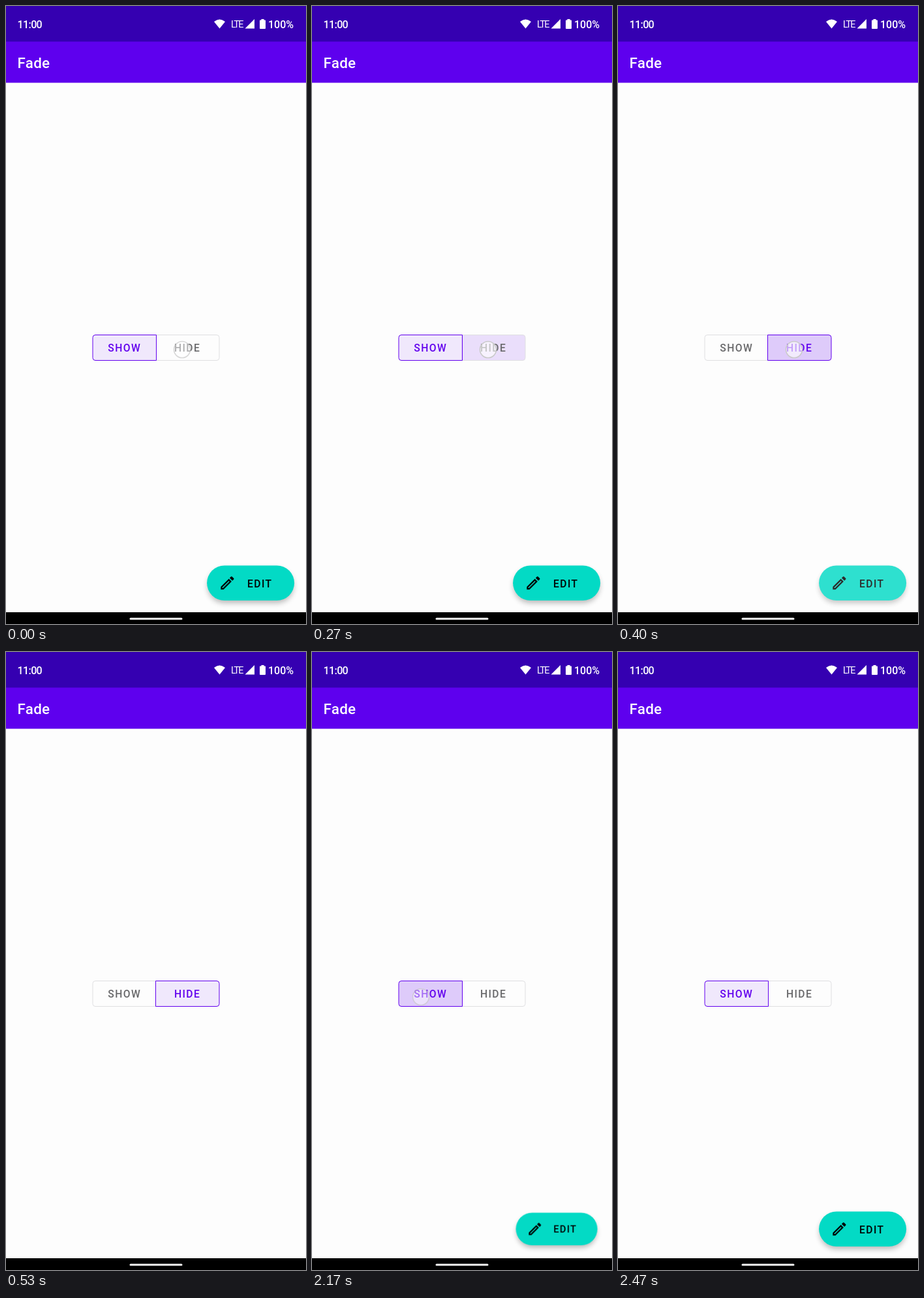
These frames come from a looping animation (460x946 px, 2.51 s). An HTML page:

```html
<!DOCTYPE html>
<html lang="en">
<head>
<meta charset="utf-8">
<title>Fade</title>
<style>
  html, body { margin: 0; width: 100%; height: 100%; overflow: hidden; background: #fdfdfd; }
  svg { display: block; width: 460px; height: 946px; }
  text { font: 500 15.67px Roboto, sans-serif; }
  .label { letter-spacing: 1.4px; }
  .status { font-size: 16px; fill: #fff; }
  .off path { fill: none; stroke: #dfdfe1; }
  .off text { fill: #68686a; }
  .on path { fill: none; stroke: #6200ee; stroke-width: 1.2; }
  .on text { fill: #6200ee; }
  .tint { fill: #f0e8fc; }
  .ripple { fill: rgba(98, 0, 238, .12); }
  .touch { fill: rgba(255, 255, 255, .62); stroke: #cacaca; stroke-width: 1.6; }
  #fab { transform-origin: 375px 883px; }
</style>
</head>
<body>
<svg viewBox="0 0 460 946">
  <defs>
    <path id="half" d="M230.5 503.5H137a4 4 0 0 0-4 4v31a4 4 0 0 0 4 4h93.5z"/>
    <clipPath id="leftClip"><use href="#half"/></clipPath>
    <clipPath id="rightClip"><use href="#half" transform="matrix(-1 0 0 1 460 0)"/></clipPath>
    <filter id="shadow" x="-20%" y="-30%" width="140%" height="180%">
      <feGaussianBlur stdDeviation="4"/>
    </filter>
  </defs>

  <rect width="460" height="946" fill="#fdfdfd"/>
  <rect width="460" height="55" fill="#3500b1"/>
  <rect y="54.5" width="460" height="63" fill="#5e00ee"/>

  <text class="status" x="17.5" y="33.5" style="letter-spacing:-.6px">11:00</text>
  <text class="status" x="402" y="33.5">100%</text>
  <text class="status" x="345" y="33" style="font-size:14.5px;font-weight:400;letter-spacing:-1.6px">LTE</text>
  <g fill="#fff">
    <path d="M319 24q8.5-7 17 0l-8.5 10.5z"/>
    <path d="M381 20v14.5h-14.5z"/>
    <path d="M391.5 20h4v1.5h1.5q1 0 1 1v11.5q0 1-1 1h-7q-1 0-1-1v-11.5q0-1 1-1h1.5z"/>
  </g>
  <text x="17.5" y="94.5" fill="#fff" style="font-size:22.4px;letter-spacing:.3px">Fade</text>

  <use href="#half" class="tint showOn"/>
  <use href="#half" class="tint hideOn" transform="matrix(-1 0 0 1 460 0)"/>
  <g clip-path="url(#rightClip)"><g transform="translate(270 526)"><circle id="hideRipple" class="ripple" r="80"/></g></g>
  <g clip-path="url(#leftClip)"><g transform="translate(167 528)"><circle id="showRipple" class="ripple" r="80"/></g></g>

  <g class="off hideOn">
    <path d="M230 503.5H137a4 4 0 0 0-4 4v31a4 4 0 0 0 4 4h93"/>
    <text class="label" x="156.3" y="529">SHOW</text>
  </g>
  <g class="off showOn">
    <path d="M230 503.5h93a4 4 0 0 1 4 4v31a4 4 0 0 1-4 4h-93"/>
    <text class="label" x="258" y="529">HIDE</text>
  </g>
  <g class="on showOn">
    <use href="#half" fill="none" stroke="#6200ee"/>
    <text class="label" x="156.3" y="529">SHOW</text>
  </g>
  <g class="on hideOn">
    <use href="#half" fill="none" stroke="#6200ee" transform="matrix(-1 0 0 1 460 0)"/>
    <text class="label" x="258" y="529">HIDE</text>
  </g>

  <g id="fab">
    <rect x="309" y="862" width="132" height="52" rx="26" opacity=".27" filter="url(#shadow)"/>
    <rect x="308.1" y="856.4" width="134" height="53.7" rx="26.85" fill="#03dac5"/>
    <path transform="translate(326 869.8) scale(1.119)" d="M14.06 9.02l.92.92L5.92 19H5v-.92l9.06-9.06M17.66 3c-.25 0-.51.1-.7.29l-1.83 1.83 3.75 3.75 1.83-1.83c.39-.39.39-1.02 0-1.41l-2.34-2.34c-.2-.2-.45-.29-.71-.29zm-3.6 3.19L3 17.25V21h3.75L17.81 9.94l-3.75-3.75z"/>
    <text class="label" x="370" y="889.5">EDIT</text>
  </g>

  <circle id="hideTouch" class="touch" cx="270" cy="526" r="12.5"/>
  <circle id="showTouch" class="touch" cx="167" cy="528" r="12.5"/>

  <rect y="928" width="460" height="18"/>
  <rect x="189.5" y="936.5" width="81" height="3" rx="1.5" fill="#f4f4f4"/>
</svg>
<script>
  const LOOP = 2510, HIDE_AT = 370, SHOW_AT = 2110;
  const start = document.timeline.currentTime ?? 0;

  // steps: [ms, value, easing to the next step]
  function play(selector, prop, steps) {
    const frames = steps.map(([ms, value, easing = 'linear']) =>
      ({ offset: ms / LOOP, [prop]: value, easing }));
    frames.unshift({ ...frames[0], offset: 0, easing: 'linear' });
    frames.push({ ...frames.at(-1), offset: 1 });
    for (const el of document.querySelectorAll(selector)) {
      el.animate(frames, { duration: LOOP, iterations: Infinity }).startTime = start;
    }
  }

  const swap = (ms, a, b) => [[ms, a], [ms, b]];

  function ripple(id, down, full, hold, end) {
    play(id, 'transform', [[down, 'scale(.15)', 'cubic-bezier(.4,0,.2,1)'], [full, 'scale(1)']]);
    play(id, 'opacity', [[down, 0], [down + 50, 1], [hold, 1], [end, 0]]);
  }

  play('.showOn', 'opacity', [...swap(HIDE_AT, 1, 0), ...swap(SHOW_AT, 0, 1)]);
  play('.hideOn', 'opacity', [...swap(HIDE_AT, 0, 1), ...swap(SHOW_AT, 1, 0)]);

  ripple('#hideRipple', 100, 250, 410, 520);
  ripple('#showRipple', 2020, 2140, 2270, 2450);

  play('#hideTouch', 'opacity', [[0, .75], [100, .75], [200, 1], [410, 1], [500, 0]]);
  play('#showTouch', 'opacity', [...swap(1970, 0, .75), [2030, .75], [2080, 1], [2140, 1], [2240, 0]]);

  play('#fab', 'opacity', [[387, 1], [470, 0], [2125, 0], [2170, 1]]);
  play('#fab', 'transform', [
    ...swap(1000, 'scale(1)', 'scale(.8)'),
    [2125, 'scale(.8)', 'cubic-bezier(0,0,.2,1)'], [2270, 'scale(1)'],
  ]);
</script>
</body>
</html>
```
